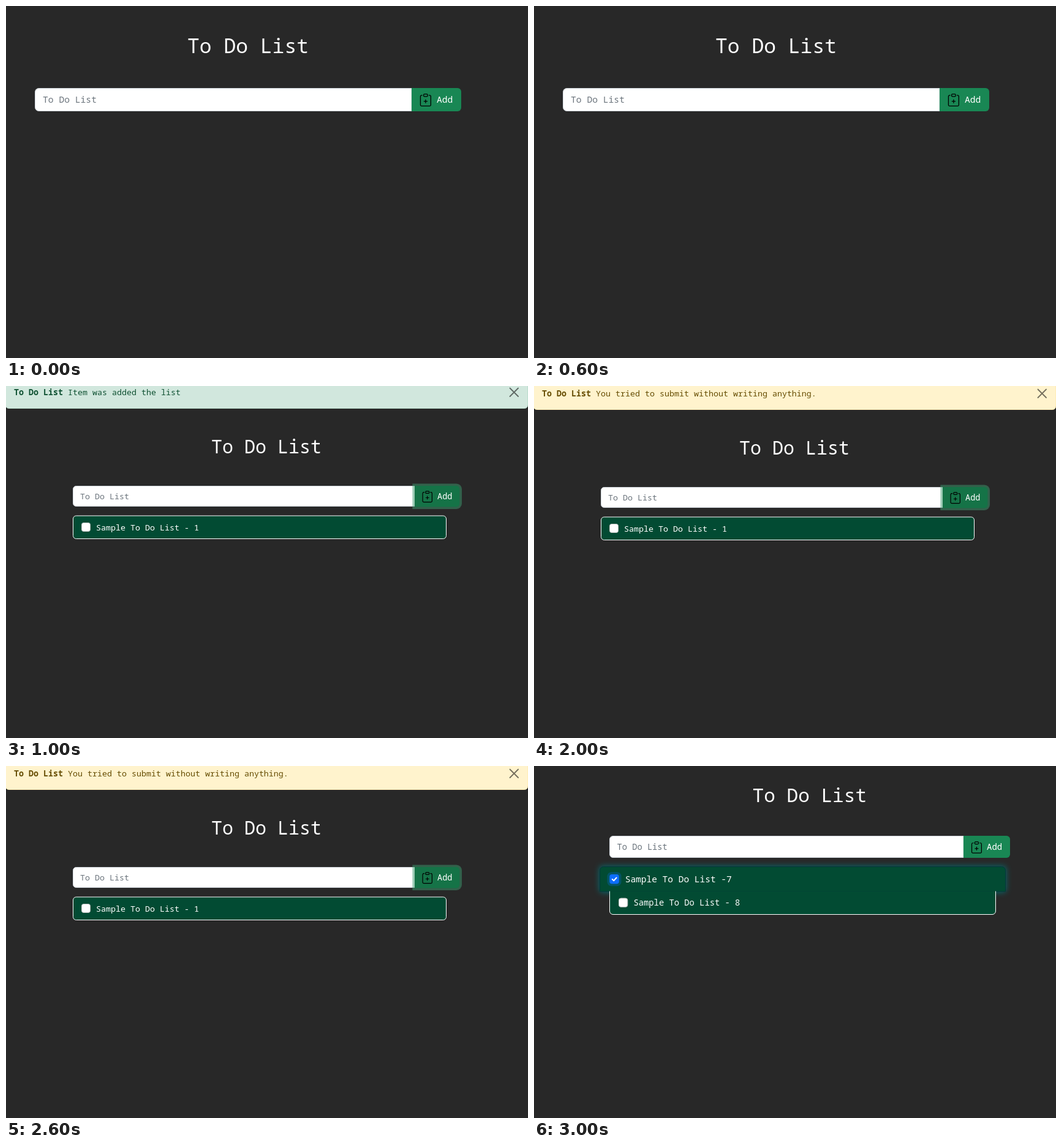
Write an HTML page that moves like this. It is 852 px wide and 575 px high and loops after 4000 ms.

```html
<!DOCTYPE html>
<html lang="en">
<head>
<meta charset="utf-8">
<title>To Do List</title>
<style>
  html, body { margin: 0; width: 100%; height: 100%; overflow: hidden; background: #282828; }
  svg { display: block; width: 852px; height: 575px; }
  text { font-family: "Noto Sans Mono", "DejaVu Sans Mono", monospace; fill: #fff; }
  .hint { fill: #6c757d; }
  .field { fill: #fff; stroke: #ced4da; }
  .item { fill: #024b33; stroke: #fff; }
  .box { fill: #fff; stroke: #bfbfbf; }
  .btn { fill: #198754; }
  .active { fill: #157347; }
  .ring { fill: #3c996e; fill-opacity: .5; }
  .ok rect { fill: #d1e7dd; stroke: #badbcc; }
  .ok text { fill: #0f5132; }
  .warn rect { fill: #fff3cd; stroke: #ffecb5; }
  .warn text { fill: #664d03; }
  .bold { font-weight: 700; }
  .glow { fill: #00787c; filter: blur(5px); opacity: .75; }
  .scene { visibility: hidden; animation: show 4s step-end infinite; }
  .s2 { animation-delay: -3s; }
  .s3 { animation-delay: -2s; }
  .s4 { animation-delay: -1s; }
  @keyframes show {
    0% { visibility: visible; }
    25%, 100% { visibility: hidden; }
  }
</style>
</head>
<body>
<svg viewBox="0 0 852 575" xmlns="http://www.w3.org/2000/svg">
  <defs>
    <g id="clip" fill="none" stroke="#000" stroke-linecap="round">
      <path stroke-linecap="butt" d="M4 2H3A1.5 1.5 0 0 0 1.5 3.5V14A1.5 1.5 0 0 0 3 15.5H13A1.5 1.5 0 0 0 14.5 14V3.5A1.5 1.5 0 0 0 13 2H12"/>
      <rect x="5.5" y=".5" width="5" height="3" rx="1"/>
      <path d="M8 7.5V11.5M6 9.5H10"/>
    </g>
    <path id="close" d="M822.5 3.5L836 17M836 3.5L822.5 17" fill="none" stroke="#000" stroke-opacity=".55" stroke-width="1.8" stroke-linecap="round"/>
    <g id="form">
      <text x="335" y="110" font-size="30">To Do List</text>
      <path class="field" d="M668 163.5H114.500a5 5 0 0 0-5 5V191.500a5 5 0 0 0 5 5H668Z"/>
      <path class="ring" d="M663.400 159.400H735a9 9 0 0 1 9 9V192a9 9 0 0 1-9 9H663.400Z"/>
      <path class="active" d="M667 163H735a5.400 5.400 0 0 1 5.400 5.400V192a5.400 5.400 0 0 1-5.400 5.400H667Z"/>
      <use href="#clip" transform="translate(678.300 171.300) scale(1.18)"/>
      <g font-size="13.330">
        <text class="hint" x="121" y="185">To Do List</text>
        <text x="704" y="185" font-size="13.600">Add</text>
        <rect class="item" x="109.500" y="212" width="609" height="37.500" rx="5"/>
        <rect class="box" x="123.500" y="223.500" width="14" height="14" rx="3.200"/>
        <text x="147" y="235.500">Sample To Do List - 1</text>
      </g>
    </g>
  </defs>

  <g class="scene s1">
    <text x="296" y="76.500" font-size="33">To Do List</text>
    <path class="field" d="M662 134.500H53.500a6 6 0 0 0-6 6V165.500a6 6 0 0 0 6 6H662Z"/>
    <path class="btn" d="M662 134H737a6 6 0 0 1 6 6V166a6 6 0 0 1-6 6H662Z"/>
    <use href="#clip" transform="translate(674.500 143.300) scale(1.3)"/>
    <g font-size="14.660">
      <text class="hint" x="60" y="158">To Do List</text>
      <text x="703" y="158">Add</text>
    </g>
  </g>

  <g class="scene s2">
    <g class="ok" font-size="13.330">
      <rect x="-.5" y="-20" width="852" height="56.500" rx="5"/>
      <text class="bold" x="13" y="15">To Do List</text>
      <text x="101" y="15">Item was added the list</text>
    </g>
    <use href="#close"/>
    <use href="#form"/>
  </g>

  <g class="scene s3">
    <g class="warn" font-size="13.330">
      <rect x="-.5" y="-20" width="852" height="58.500" rx="5"/>
      <text class="bold" x="13" y="17">To Do List</text>
      <text x="101" y="17">You tried to submit without writing anything.</text>
    </g>
    <use href="#close" y="2"/>
    <use href="#form" y="2"/>
  </g>

  <g class="scene s4">
    <text x="356.500" y="59" font-size="31.100">To Do List</text>
    <path class="field" d="M701 114.500H129a5.500 5.500 0 0 0-5.500 5.500V144a5.500 5.500 0 0 0 5.500 5.500H701Z"/>
    <path class="btn" d="M701 114H771.300a5.700 5.700 0 0 1 5.700 5.700V144.300a5.700 5.700 0 0 1-5.700 5.700H701Z"/>
    <use href="#clip" transform="translate(712.700 123.300) scale(1.22)"/>
    <text class="hint" x="135.500" y="137" font-size="13.730">To Do List</text>
    <text x="739" y="137" font-size="14">Add</text>

    <rect class="glow" x="106" y="163" width="665" height="44" rx="6"/>
    <path d="M107.500 205V170.500a6 6 0 0 1 6-6H763.500a6 6 0 0 1 6 6V205Z" fill="#024b33" stroke="#03363a"/>
    <rect x="119.500" y="173.300" width="23" height="23" rx="7" fill="#0d6efd" fill-opacity=".25"/>
    <rect x="123.300" y="177" width="15.500" height="15.500" rx="4" fill="#0d6efd"/>
    <path d="M127.800 185L130.200 187.400L134.600 182.500" fill="none" stroke="#fff" stroke-width="2" stroke-linecap="round" stroke-linejoin="round"/>
    <text x="148.700" y="189.500" font-size="14.500">Sample To Do List -7</text>

    <path class="item" d="M123.500 204.500V237a5.500 5.500 0 0 0 5.500 5.500H748a5.500 5.500 0 0 0 5.500-5.500V204.500" />
    <rect class="box" x="138.500" y="216" width="14.300" height="14.300" rx="3.400"/>
    <text x="162.500" y="228" font-size="13.800">Sample To Do List - 8</text>
  </g>
</svg>
</body>
</html>
```
